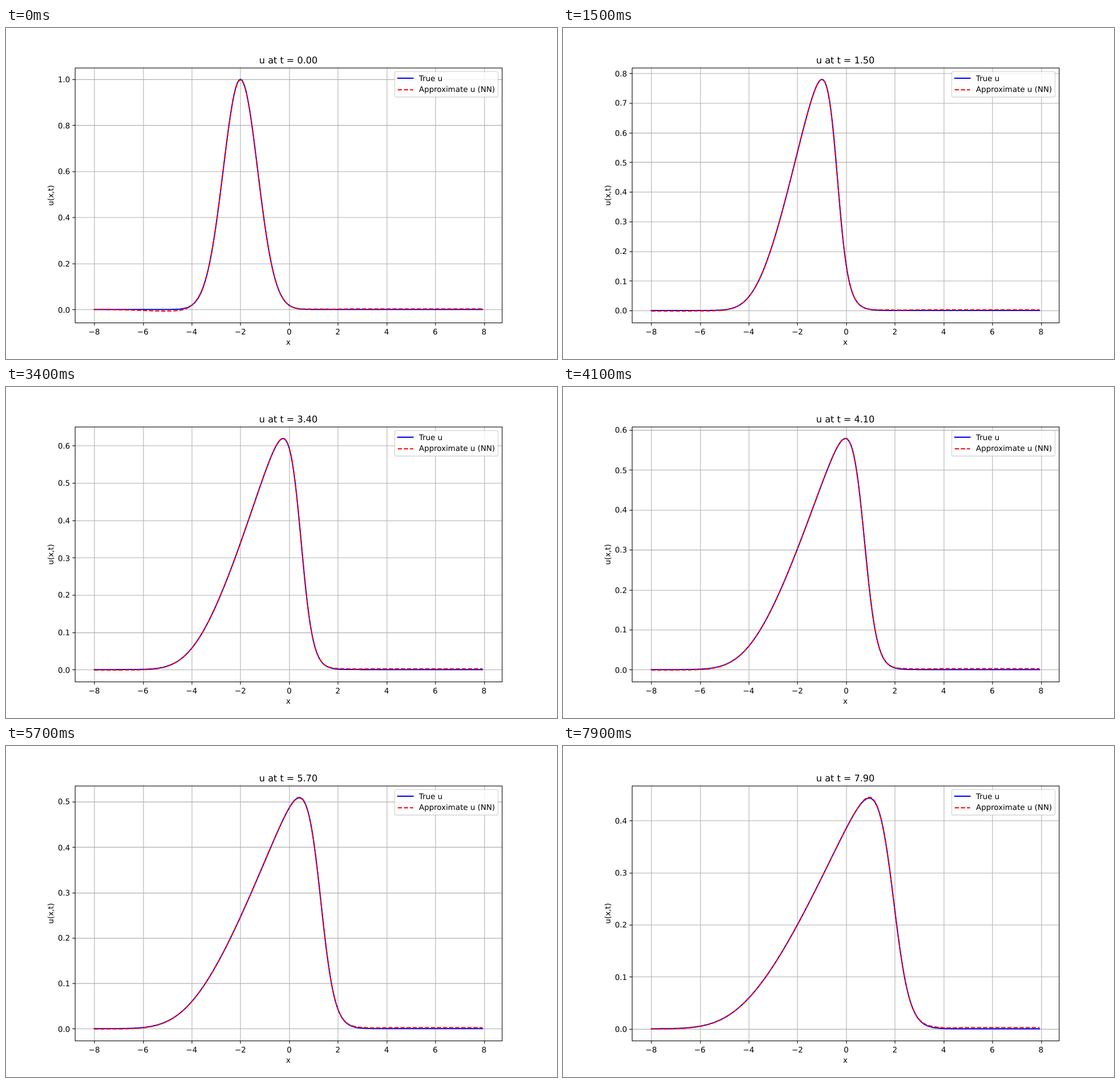
An HTML page for the animation above (8000 ms loop, 966 px wide and 580 px high).

```html
<!DOCTYPE html>
<html lang="en">
<head>
<meta charset="utf-8">
<title>u(x,t)</title>
<style>
  html, body { margin: 0; width: 100%; height: 100%; overflow: hidden; background: #fff; }
  svg { display: block; width: 100%; height: 100%; }
  text { font: 13.89px 'DejaVu Sans', sans-serif; fill: #000; text-rendering: geometricPrecision; }
  #title { font-size: 16.67px; }
  .mid { text-anchor: middle; }
  .grid { stroke: #b0b0b0; stroke-width: 1.11; }
  .tick, .frame { stroke: #000; stroke-width: 1.11; fill: none; }
  .true, .approx { fill: none; stroke-width: 2.083; stroke-linejoin: round; }
  .true { stroke: #00f; stroke-linecap: square; }
  .approx { stroke: #f00; stroke-dasharray: 7.71 3.33; }
</style>
</head>
<body>
<svg viewBox="0 0 1000 600" preserveAspectRatio="none">
  <g id="xAxis"></g>
  <g id="yAxis"></g>
  <path id="trueLine" class="true"/>
  <path id="approxLine" class="approx"/>
  <rect class="frame" x="125.5" y="72.5" width="775" height="462"/>
  <text id="title" class="mid" x="512.5" y="64"></text>
  <text class="mid" x="512.5" y="574">x</text>
  <text class="mid" transform="translate(86 303.5) rotate(-90)">u(x,t)</text>
  <rect x="705.5" y="79" width="187.5" height="46.2" rx="2.78"
        fill="#fff" stroke="#ccc" stroke-width="1.39" opacity=".8"/>
  <path class="true" d="M711 91H738.8"/>
  <path class="approx" d="M711 112H738.8"/>
  <text x="749.5" y="96">True u</text>
  <text x="749.5" y="116">Approximate u (NN)</text>
</svg>
<script>
const NU = 0.1, COUNT = 256, STEP_MS = 100, STEPS = 80;
const LEFT = 125, RIGHT = 900, TOP = 72, BOTTOM = 534;
const byId = id => document.getElementById(id);
const xs = Array.from({ length: COUNT }, (_, i) => -8 + i / 16);
const xPix = x => LEFT + 775 / 22 + (x + 8) * 775 / 1.1 / 15.9375;
const snap = p => Math.floor(p + 0.5) + 0.5;
const bump = (x, mid, width) => Math.exp(-(((x - mid) / width) ** 2));
const sigmoid = z => 1 / (1 + Math.exp(-z));

function erf(z) {
  const a = Math.abs(z), k = 1 / (1 + 0.3275911 * a);
  const poly = k * (0.254829592 + k * (-0.284496736 + k * (1.421413741 + k * (-1.453152027 + k * 1.061405429))));
  return Math.sign(z) * (1 - poly * Math.exp(-a * a));
}

// Cole-Hopf solution of u_t + u u_x = NU u_xx with u(x,0) = exp(-(x+2)^2)
function burgers(x, t) {
  if (t === 0) return bump(x, -2, 1);
  const spread = Math.sqrt(4 * NU * t);
  let top = 0, sum = 0;
  for (let s = -6; s <= 6; s += 0.08) {
    const y = x + s * spread;
    const w = Math.exp(-s * s - Math.sqrt(Math.PI) * erf(y + 2) / (4 * NU));
    top += w * bump(y, -2, 1);
    sum += w;
  }
  return top / sum;
}

// Small misfit of the network: early dip, tail offsets, peak overshoot
function misfit(x, t, peak) {
  const early = Math.exp(-t / 0.25), front = 0.8 + 0.3 * t;
  const dip = early * (0.006 * bump(x, -3.7, 0.5) - 0.0067 * bump(x, -5, 1.5));
  const tail = -0.0023 * Math.exp(-t / 5) * (1 - early) * sigmoid(-(x + 5) / 0.4);
  const lead = 0.0023 * sigmoid((x - front) / 0.25) - 0.0008 * bump(x, front + 1, 0.5);
  const crest = (0.0002 * t - 0.002 * early) * bump(x, peak, 0.4);
  return dip + tail + lead + crest;
}

function drawXAxis() {
  let out = '';
  for (let v = -8; v <= 8; v += 2) {
    const p = snap(xPix(v)), label = v < 0 ? '\u2212' + -v : v;
    out += `<path class="grid" d="M${p} ${TOP}V${BOTTOM}"/><path class="tick" d="M${p} 534.5V539.5"/>`
      + `<text class="mid" x="${xPix(v) - (v < 0 ? 0.2 : 0)}" y="555">${label}</text>`;
  }
  byId('xAxis').innerHTML = out;
}

function drawYAxis(yPix, range) {
  const step = range > 0.9 ? 0.2 : 0.1;
  let out = '';
  for (let i = 0; yPix(i * step) >= TOP; i++) {
    const y = yPix(i * step), p = snap(y);
    out += `<path class="grid" d="M${LEFT} ${p}H${RIGHT}"/><path class="tick" d="M125.5 ${p}H120.5"/>`
      + `<text x="94.1" y="${Math.round(y + 5.3)}">${(i * step).toFixed(1)}</text>`;
  }
  byId('yAxis').innerHTML = out;
}

function draw(step) {
  const t = step / 10;
  const exact = xs.map(x => burgers(x, t));
  const peak = xs[exact.indexOf(Math.max(...exact))];
  const approx = xs.map((x, i) => exact[i] + misfit(x, t, peak));
  const low = Math.min(...exact, ...approx), high = Math.max(...exact, ...approx);
  const yPix = v => 513 - (v - low) / (high - low) * 420;
  const line = vals => 'M' + vals.map((v, i) => xPix(xs[i]).toFixed(2) + ' ' + yPix(v).toFixed(2)).join('L');
  drawYAxis(yPix, (high - low) * 1.1);
  byId('trueLine').setAttribute('d', line(exact));
  byId('approxLine').setAttribute('d', line(approx));
  byId('title').textContent = 'u at t = ' + t.toFixed(2);
}

let shown = -1;
const start = performance.now();
function tick() {
  const step = Math.floor((performance.now() - start) / STEP_MS) % STEPS;
  if (step !== shown) draw(shown = step);
  requestAnimationFrame(tick);
}
drawXAxis();
tick();
</script>
</body>
</html>
```
